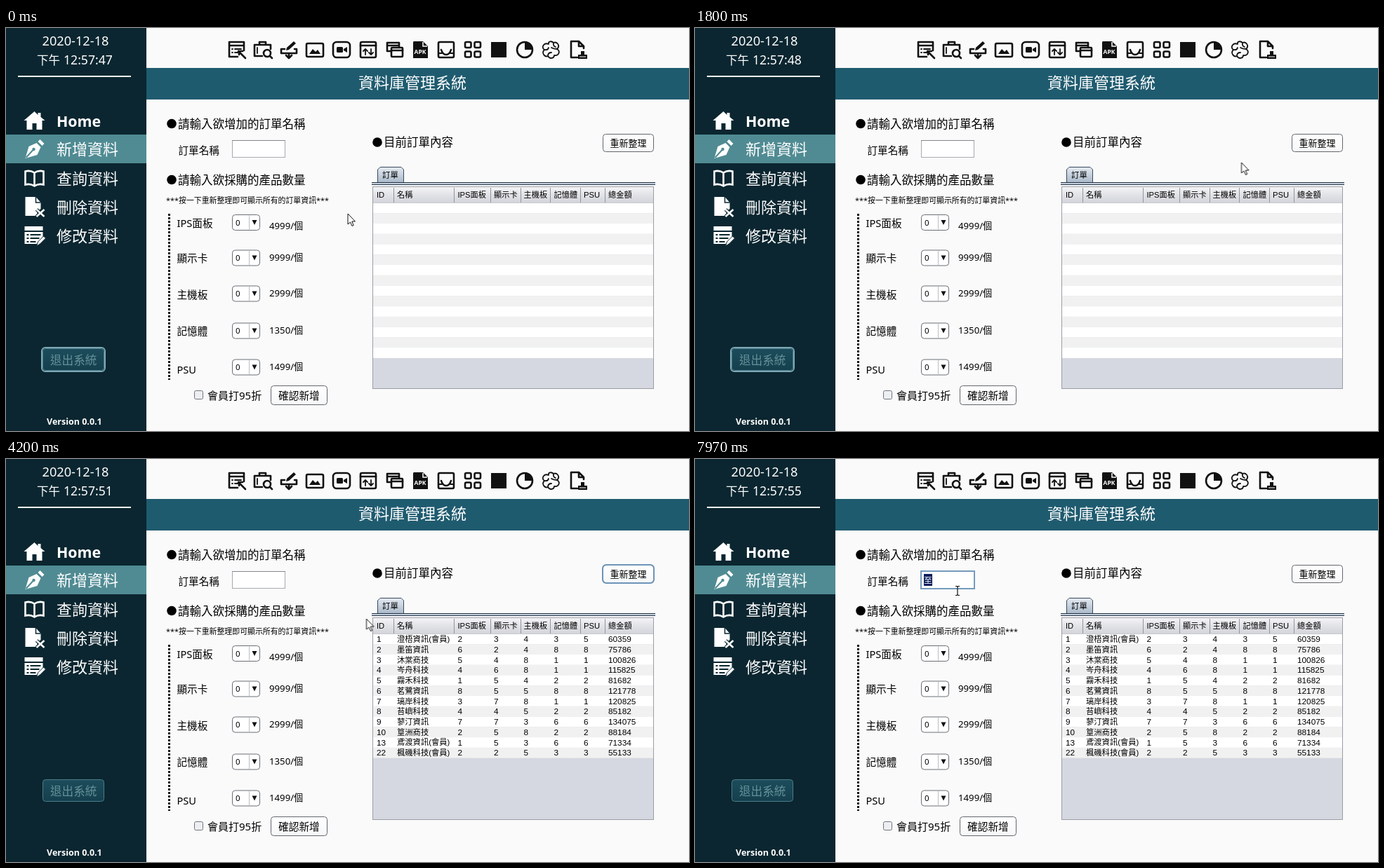
An HTML page for the animation above (8000 ms loop, 973 by 575 pixels).

```html
<!DOCTYPE html>
<html lang="zh-Hant">
<head>
<meta charset="utf-8">
<title>資料庫管理系統</title>
<style>
html, body { margin: 0; width: 100%; height: 100%; overflow: hidden; background: #fafafa; }
svg { display: block; width: 973px; height: 575px; }
text { font-family: 'Noto Sans', 'Noto Sans CJK TC', 'Noto Sans CJK', sans-serif; white-space: pre; }
.grid text { font-family: 'Liberation Sans', 'Noto Sans CJK TC', 'Noto Sans CJK', sans-serif; }
.line { fill: none; stroke: #111; stroke-width: 2.6; stroke-linejoin: round; stroke-linecap: round; }
.thin { stroke-width: 1.8; }
.anim { animation: 8s step-end infinite; }
.before-load { animation-name: before-load; }
.after-load { animation-name: after-load; }
.refresh-focus { animation-name: refresh-focus; }
.field-focus { animation-name: field-focus; }
.caret { animation-name: caret; }
.compose { animation-name: compose; }
.arrow { animation-name: arrow; }
.beam { animation-name: beam; }
.ticks { animation: ticks 8s infinite; }
.pointer { animation: pointer 8s infinite; }

@keyframes before-load { 0% { opacity: 1 } 29.5%, 100% { opacity: 0 } }
@keyframes after-load { 0% { opacity: 0 } 29.5%, 100% { opacity: 1 } }
@keyframes refresh-focus { 0% { opacity: 0 } 29.5% { opacity: 1 } 61.3%, 100% { opacity: 0 } }
@keyframes field-focus { 0% { opacity: 0 } 61.3%, 100% { opacity: 1 } }
@keyframes caret {
  0%, 67.5%, 80%, 92.5%, 100% { opacity: 0 }
  61.3%, 73.8%, 86.3% { opacity: 1 }
}
@keyframes compose { 0% { opacity: 0 } 96.3%, 100% { opacity: 1 } }
@keyframes arrow { 0% { opacity: 1 } 57%, 100% { opacity: 0 } }
@keyframes beam { 0% { opacity: 0 } 57%, 100% { opacity: 1 } }
@keyframes ticks {
  0% { transform: translateY(0); animation-timing-function: steps(8, end) }
  99.4%, 100% { transform: translateY(-240px) }
}
@keyframes pointer {
  0%, 13% { transform: translate(487px, 265px); animation-timing-function: ease-in-out }
  27.5%, 35% { transform: translate(874px, 168px); animation-timing-function: ease-in-out }
  44.1% { transform: translate(805px, 312px); animation-timing-function: ease-in-out }
  58%, 100% { transform: translate(374px, 188px) }
}
</style>
</head>
<body>
<svg id="stage" viewBox="0 0 973 575" xmlns="http://www.w3.org/2000/svg"></svg>
<script>
// Text is placed by its left edge and vertical centre.
const text = (x, cy, size, str, attrs = '') =>
  `<text x="${x}" y="${cy + size * 0.365}" font-size="${size}" ${attrs}>${str}</text>`;
const rect = (x, y, w, h, attrs = '') =>
  `<rect x="${x}" y="${y}" width="${w}" height="${h}" ${attrs}/>`;
const path = (d, attrs = 'class="line"') => `<path d="${d}" ${attrs}/>`;
const at = (x, y, body) => `<g transform="translate(${x} ${y})">${body}</g>`;
const range = n => [...Array(n).keys()];
const WHITE = 'fill="#fff"';
const SOLID = 'fill="#111"';

const defs = `<defs>
  <linearGradient id="head" x2="0" y2="1"><stop stop-color="#f4f4f6"/><stop offset=".5" stop-color="#e2e3e7"/><stop offset="1" stop-color="#d3d5db"/></linearGradient>
  <linearGradient id="tab" x2="0" y2="1"><stop stop-color="#e4eaf1"/><stop offset="1" stop-color="#a9b8c9"/></linearGradient>
  <linearGradient id="exit" x2="0" y2="1"><stop stop-color="#1c4c5b"/><stop offset="1" stop-color="#153f4d"/></linearGradient>
  <linearGradient id="button" x2="0" y2="1"><stop stop-color="#fff"/><stop offset="1" stop-color="#f6f7f8"/></linearGradient>
  <clipPath id="clock"><rect x="76" y="34" width="100" height="25"/></clipPath>
</defs>`;

function sidebar() {
  const icons = [
    path('M0-14-15-1h4v13h8V3h6v9h8V-1h4L9-6v-6H5v3Z', WHITE),
    path('M-13 13-8-4 3-9 9-3 4 8ZM5-11 8-14 14-8 11-5Z', WHITE) +
      path('M-12 12-2 1', 'stroke="#508b93" stroke-width="2"') + '<circle cx="-1" r="2.2" fill="#508b93"/>',
    path('M0-8Q-6-12-13-10V9Q-6 7 0 11 6 7 13 9V-10Q6-12 0-8V11', 'fill="none" stroke="#fff" stroke-width="2.6"'),
    path('M-13-15H2L9-7V2L4 6V12H-13Z', WHITE) + path('M2-15V-7H9', 'fill="none" stroke="#0b2630" stroke-width="1.5"') +
      path('M3 3 14 13M14 3 3 13', 'stroke="#0b2630" stroke-width="5"') + path('M3 3 14 13M14 3 3 13', 'stroke="#fff" stroke-width="2.6"'),
    path('M-14-14H12V-8H-14ZM-14-6H12V2L4 11H-14Z', WHITE) +
      path('M-11-2H-8M-6-2H9M-11 3H-8M-6 3H7M-11 8H-8M-6 8H2', 'stroke="#0b2630" stroke-width="2"') +
      path('M3 14 5 8 13 0 16 3 8 11Z', 'fill="#fff" stroke="#0b2630" stroke-width="1"')
  ];
  const labels = ['Home', '新增資料', '查詢資料', '刪除資料', '修改資料'];
  const rows = [133, 173, 214.5, 256, 297];
  const nav = labels.map((label, i) =>
    at(40.5, rows[i], icons[i]) + text(72, rows[i], i ? 22 : 21.4, label, i ? WHITE : WHITE + ' font-weight="700"'));
  const seconds = range(9).map(i => text(82, 46 + i * 30, 17.6, `12:57:${47 + i}`));
  return rect(0, 0, 200, 575, 'fill="#0b2630"') + rect(0, 152, 200, 41, 'fill="#508b93"') +
    `<g ${WHITE}>` + text(51.5, 18, 18.2, '2020-12-18') + text(44, 46, 16.5, '下午') +
    `<g clip-path="url(#clock)"><g class="ticks">${seconds.join('')}</g></g>` +
    rect(17, 68, 161, 2) + text(58, 561.5, 12.5, 'Version 0.0.1', 'font-weight="700"') + '</g>' + nav.join('') +
    rect(52.5, 457.5, 87, 31, 'rx="4" fill="url(#exit)" stroke="#4b7d89"') +
    rect(51, 456, 90, 34, 'rx="5" fill="none" stroke="#7ca7b5" stroke-width="2" class="anim before-load"') +
    text(63, 473.5, 16.6, '退出系統', 'fill="#649098"');
}

function toolbar() {
  const frame = rect(-11, -11, 22, 22, 'rx="2" class="line"');
  const icons = [
    [329, path('M10 1V-11H-11V10H1M-11-6H10') + path('M-7-1H-6M-3-1H6M-7 4H-6M-3 4H2', 'class="line thin"') +
      path('M2 2 12 12M3 7V2H8')],
    [366, path('M-1 9H-12V-7H11V-1M-5-7V-11H4V-7') + path('M-8-3V5', 'class="line thin"') +
      '<circle cx="6" cy="5" r="5" class="line"/>' + path('M10 9 13 12')],
    [403, path('M-6-1H-11V5H11V-1H8M0 5V12M-4 8 0 12 4 8') + path('M-4 1-3-3 7-12 10-9 0 0Z', SOLID)],
    [440, rect(-12, -9, 24, 19, 'rx="2" class="line"') + path('M-8 6-3-1 1 3 4 0 8 6Z', SOLID)],
    [478, rect(-12, -11, 24, 22, 'rx="5" class="line"') + rect(-7, -4, 9, 8, 'rx="1.5" fill="#111"') + path('M3-1 8-4V4L3 1Z', SOLID)],
    [516, frame + path('M-11-6H11') + path('M-4 7V-1M-7 2-4-1-1 2M4-1V7M1 4 4 7 7 4', 'class="line thin"')],
    [554, path('M-5 2H-11V-10H6V-4M-11-6H6') + rect(-5, -3, 16, 13, 'rx="1" class="line"') + path('M-5 1H11')],
    [590, path('M-9-12H4L11-5V12H-10V-11Z', SOLID) + path('M4-11V-5H10', 'fill="none" stroke="#fff" stroke-width="1.5"') +
      text(0, 3, 8.5, 'APK', WHITE + ' font-weight="700" text-anchor="middle"')],
    [627, frame + path('M-7 0Q-5 7 0 7T7 0') + path('M-11 5H-6M6 5H11', 'class="line thin"')],
    [665, [-11, 2.5].map(x => [-11, 2.5].map(y => rect(x, y, 8.5, 8, 'rx="2" class="line"')).join('')).join('')],
    [702, rect(-11, -11, 22, 22, SOLID)],
    [739, '<circle r="11" class="line"/>' + path('M0-11A11 11 0 0 1 11 0H0Z', SOLID)],
    [776, path('M-3-8C-10-11-14-3-9 0-14 5-8 11-4 9-1 14 5 12 5 8 12 9 14 2 9-1 14-6 9-12 4-10 1-13-4-12-3-8ZM-9 0Q-4 1-3-3M-4 9Q-4 4 1 4M4-10Q3-5 7-4M9-1Q4-1 1-3', 'class="line thin"')],
    [816, path('M-2 11H-11V-12H0L7-5V-2M0-12V-5H7') + path('M3 2H8V7H12V13H-1V7H3Z', SOLID) + path('M1 10H10', 'stroke="#fff"')]
  ];
  return icons.map(([x, body]) => at(x, 31, body)).join('') +
    rect(200, 57, 773, 45, 'fill="#1f5b6f"') + text(502, 77.5, 22, '資料庫管理系統', WHITE);
}

const heading = (x, y, str) => `<circle cx="${x}" cy="${y}" r="6.8"/>` + text(x + 9, y, 16.5, str);
const button = (x, y, w, h) => rect(x, y, w, h, 'rx="4" fill="url(#button)" stroke="#62666d"');

function form() {
  const products = [['IPS面板', 4999, 279, 277.5, 282], ['顯示卡', 9999, 329, 328, 327.5],
    ['主機板', 2999, 381, 379, 378], ['記憶體', 1350, 433, 432, 431.5], ['PSU', 1499, 488, 484, 483]];
  const rows = products.map(([name, price, labelY, boxY, priceY]) =>
    text(243.5, labelY, 14.6, name) + text(375, priceY, 13.2, price + '/個') +
    rect(322.5, boxY - 11, 39, 22, 'rx="4" fill="#fff" stroke="#696e76"') +
    path(`M346.5 ${boxY - 10}v20`, 'stroke="#b9bdc4"') +
    path(`M350.5 ${boxY - 3.5}h7l-3.5 7Z`, SOLID) + text(327, boxY, 11.5, 0));
  return heading(236, 136.5, '請輸入欲增加的訂單名稱') + text(245.5, 175, 14.6, '訂單名稱') +
    rect(322.5, 160.5, 75, 24, 'fill="#fff" stroke="#a6a9b0"') + path('M322 160.5H398', 'stroke="#83868d"') +
    `<g class="anim field-focus">${rect(322, 160, 76, 25, 'fill="none" stroke="#759bbd" stroke-width="2"')}</g>` +
    rect(326, 164, 1.2, 17, 'class="anim caret"') +
    `<g class="anim compose">${rect(326, 164, 12, 17, 'fill="#0b1f5c"') + text(326.3, 172.5, 11.5, '至', WHITE)}</g>` +
    heading(236, 216.5, '請輸入欲採購的產品數量') +
    text(228, 246.5, 10.9, '***按一下重新整理即可顯示所有的訂單資訊***') +
    path('M232.5 265V502', 'stroke="#111" stroke-width="3" stroke-dasharray="3 2"') + rows.join('') +
    rect(268.5, 517.5, 12, 12, 'rx="2" fill="#eceef1" stroke="#70747c"') + text(287, 524.5, 15, '會員打95折') +
    button(377.5, 510.5, 80, 27) + text(388, 524.5, 14.7, '確認新增');
}

function orders() {
  const top = 249.5, pitch = 14.76;
  const columns = [528, 557, 643.5, 695, 737.5, 780.5, 823, 858];
  const titles = 'ID 名稱 IPS面板 顯示卡 主機板 記憶體 PSU 總金額'.split(' ');
  const records = `1 澄梧資訊(會員) 2 3 4 3 5 60359
2 墨笛資訊 6 2 4 8 8 75786
3 沐棠商技 5 4 8 1 1 100826
4 岑舟科技 4 6 8 1 1 115825
5 霧禾科技 1 5 4 2 2 81682
6 茗鷺資訊 8 5 5 8 8 121778
7 璃岸科技 3 7 8 1 1 120825
8 苔嶼科技 4 4 5 2 2 85182
9 蓼汀資訊 7 7 3 6 6 134075
10 篁洲商技 2 5 8 2 2 88184
13 鳶渡資訊(會員) 1 5 3 6 6 71334
22 楓磯科技(會員) 2 2 5 3 3 55133`.split('\n').map(row => row.split(' '));
  const stripes = n => range(n).map(i =>
    rect(523, top + i * pitch, 399, pitch, `fill="${i % 2 ? '#f1f1f1' : '#fff'}"`)).join('');
  const cells = records.map((row, r) => row.map((value, c) =>
    text(columns[c], 257 + r * 14.73, c === 1 ? 11.3 : 11.8, value)).join('')).join('');
  const dividers = [552.5, 638.5, 690.5, 733.5, 775.5, 818.5, 853.5].map(x => `M${x} 228V249`).join('');
  return heading(529, 163, '目前訂單內容') + button(850.5, 151.5, 72, 25) +
    `<g class="anim refresh-focus">${rect(850, 151, 73, 26, 'rx="5" fill="none" stroke="#6c94b8" stroke-width="2"')}</g>` +
    text(860.5, 164.5, 13, '重新整理') +
    path('M529.5 221V202L533 198.5H563L566.5 202V221Z', 'fill="url(#tab)" stroke="#39495c"') + text(536, 209.5, 11.4, '訂單') +
    rect(521, 220, 404, 4, 'fill="#c5cfda"') + path('M521 220.5H925M521 223.5H925', 'stroke="#26374a"') +
    rect(522.5, 226.5, 400, 288, 'fill="#d5d8e0" stroke="#9a9da5"') +
    rect(523, 227, 399, 22, 'fill="url(#head)"') + path(dividers + 'M523 249.5H922', 'stroke="#92959d"') +
    '<g class="grid">' + titles.map((title, i) => text(columns[i], 238, 11.2, title)).join('') +
    `<g class="anim before-load">${stripes(15)}</g><g class="anim after-load">${stripes(12)}${cells}</g></g>`;
}

const pointer = `<g class="pointer">
  ${path('M0 0V15L3.5 12 6 17.5 8.2 16.5 5.8 11H10.5Z', 'fill="#fff" stroke="#111" class="anim arrow"')}
  ${path('M-3-6.5H-1L0-5.5 1-6.5H3M0-5.5V5.5M-3 6.5H-1L0 5.5 1 6.5H3', 'fill="none" stroke="#111" stroke-width="1.2" class="anim beam"')}
</g>`;

document.getElementById('stage').innerHTML =
  defs + rect(200, 0, 773, 575, 'fill="#fafafa"') + sidebar() + toolbar() + form() + orders() + pointer;
</script>
</body>
</html>
```
